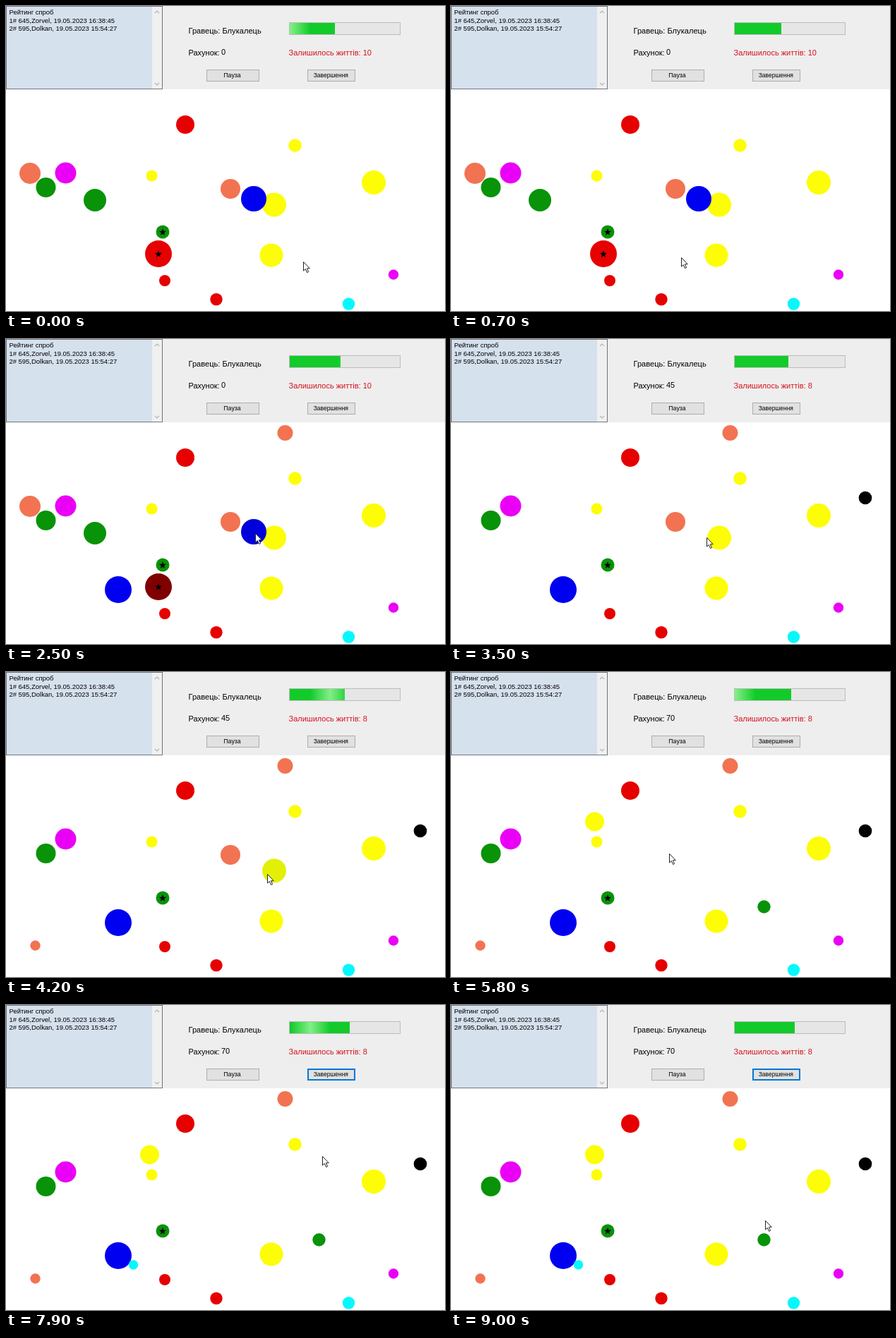
Animation, 622 px wide and 432 px high, one loop 9100 ms. Source, as an HTML page with a canvas:

```html
<!DOCTYPE html>
<html lang="uk">
<head>
<meta charset="utf-8">
<title>Кульки</title>
<style>
html, body { margin: 0; width: 100%; height: 100%; overflow: hidden; background: #fff; }
canvas { display: block; width: 622px; height: 432px; }
</style>
</head>
<body>
<canvas id="stage" width="622" height="432"></canvas>
<script>
const ctx = document.getElementById("stage").getContext("2d");
const LOOP = 9100, STEP = 100;
const FONT = '"Liberation Sans", Arial, sans-serif';

const CORAL = "#f27352", GREEN = "#089308", PINK = "#ea00f6", RED = "#e60000",
  YELLOW = "#fdfd05", BLUE = "#0000f0", CYAN = "#05f8fd", BLACK = "#000";

// x, y, radius, colour, options: from / to in ms, star, shades [time, colour]
const balls = [
  [34, 237, 15, CORAL, { to: 2700 }],
  [56.5, 257, 14, GREEN],
  [84.5, 236.5, 15, PINK],
  [126, 275, 16, GREEN, { to: 2900 }],
  [254, 168, 13, RED],
  [206.5, 240.5, 8, YELLOW],
  [409.5, 197.5, 9.3, YELLOW],
  [521, 250, 17, YELLOW],
  [318, 259, 14, CORAL, { to: 5200, shades: [[5000, "#dd6a4c"], [5100, "#b8563c"]] }],
  [380, 281.5, 17, YELLOW, { to: 4700, shades: [[4000, "#e2f008"], [4500, "#c4cc06"]] }],
  [351, 273, 18, BLUE, { to: 3000, shades: [[2400, "#0000da"], [2700, "#0000a8"]] }],
  [222, 320, 9.5, GREEN, { star: 1 }],
  [216, 351, 19, RED, { star: 1, to: 2800, shades: [[1300, "#d9606c"], [1700, "#b02c34"], [2000, "#800000"]] }],
  [376, 353, 16.5, YELLOW],
  [225, 389, 8, RED],
  [298, 415.5, 8.7, RED],
  [485.5, 422, 8.7, CYAN],
  [549, 380.5, 7.2, PINK],
  [159, 355, 19, BLUE, { from: 900 }],
  [395.5, 133, 11, CORAL, { from: 1800 }],
  [587, 225, 9.3, BLACK, { from: 2700 }],
  [41.5, 387.5, 7.2, CORAL, { from: 3600 }],
  [443.5, 332.5, 9.2, GREEN, { from: 4500 }],
  [203.5, 212, 13.5, YELLOW, { from: 5400 }],
  [180.5, 368, 6.7, CYAN, { from: 6300 }]
];

// time, x, y
const pointer = [
  [0, 421, 362], [200, 421, 362], [1200, 230, 349], [1900, 230, 349],
  [2400, 353, 275], [3100, 353, 275], [3900, 370, 286], [4600, 370, 286],
  [5000, 316, 260], [5300, 309, 257], [5900, 309, 257], [6700, 452, 94],
  [7300, 452, 94], [8400, 445, 305]
];
const barEnd = [
  [0, 466], [1500, 471], [2500, 474], [4200, 480], [4800, 480],
  [5200, 482], [5800, 482], [6800, 487]
];
const score = [[0, 0], [2800, 30], [3000, 45], [4700, 60], [5200, 70]];
const lives = [[0, 10], [2700, 9], [2900, 8]];

const smooth = k => k * k * (3 - 2 * k);

function held(keys, t, start) {
  return keys.reduce((v, [at, next]) => t >= at ? next : v, start);
}

function track(keys, t, i, ease = k => k) {
  const n = keys.findIndex(k => k[0] > t);
  if (n < 0) return keys[keys.length - 1][i];
  const a = keys[n - 1], b = keys[n];
  return a[i] + (b[i] - a[i]) * ease((t - a[0]) / (b[0] - a[0]));
}

function text(s, x, y, size, color = "#000", align = "left") {
  ctx.font = `${size}px ${FONT}`;
  ctx.textAlign = align;
  ctx.fillStyle = color;
  ctx.fillText(s, x, y);
}

function box(x, y, w, h, fill, line, weight = 1) {
  ctx.fillStyle = line;
  ctx.fillRect(x, y, w, h);
  ctx.fillStyle = fill;
  ctx.fillRect(x + weight, y + weight, w - 2 * weight, h - 2 * weight);
}

function polygon(points) {
  ctx.beginPath();
  points.forEach(([x, y]) => ctx.lineTo(x, y));
  ctx.closePath();
}

function chevron(x, y, dir) {
  ctx.beginPath();
  ctx.moveTo(x - 3, y + 1.5 * dir);
  ctx.lineTo(x, y - 1.5 * dir);
  ctx.lineTo(x + 3, y + 1.5 * dir);
  ctx.strokeStyle = "#b4b4b4";
  ctx.lineWidth = 1.2;
  ctx.stroke();
}

function drawList() {
  box(0, 0, 222, 118, "#d6e1ee", "#70757c");
  ctx.fillStyle = "#f0f0f0";
  ctx.fillRect(207, 1, 14, 116);
  chevron(214, 8.5, 1);
  chevron(214, 110.5, -1);
  text("Рейтинг спроб", 4.5, 12, 9.45);
  text("1# 645,Zorvel, 19.05.2023 16:38:45", 4.5, 23.5, 9.45);
  text("2# 595,Dolkan, 19.05.2023 15:54:27", 4.5, 35, 9.45);
}

function drawBar(t) {
  box(401, 23, 158, 18, "#e6e6e6", "#bcbcbc");
  const w = Math.round(track(barEnd, t, 1)) - 402;
  ctx.fillStyle = "#12cb2a";
  ctx.fillRect(402, 24, w, 16);
  const period = 1933;
  const phase = (t + 200) % period - 200;
  const mid = 403 + phase * 0.168;
  const shine = ctx.createLinearGradient(mid - 28, 0, mid + 28, 0);
  shine.addColorStop(0, "rgba(150,245,150,0)");
  shine.addColorStop(0.5, "rgba(150,245,150,.85)");
  shine.addColorStop(1, "rgba(150,245,150,0)");
  ctx.fillStyle = shine;
  ctx.fillRect(402, 24, w, 16);
}

function drawButtons(t, x, y) {
  box(284, 90, 75, 17, "#e1e1e1", "#adadad");
  text("Пауза", 320.5, 101.3, 8.8, "#000", "center");
  const over = x >= 427 && x < 495 && y >= 90 && y < 107;
  const focus = t >= 7000;
  const down = focus && t < 7100;
  const fill = down ? "#cce4f7" : over ? "#e5f1fb" : "#e1e1e1";
  box(427, 90, 68, 17, fill, over || focus ? "#0078d7" : "#adadad", focus && !over ? 2 : 1);
  text("Завершення", 460.3, 101.3, 8.5, "#000", "center");
}

function drawStar(x, y) {
  polygon(Array.from({ length: 10 }, (_, i) => {
    const r = i % 2 ? 2.2 : 5.4, a = i * Math.PI / 5;
    return [x + r * Math.sin(a), y - r * Math.cos(a)];
  }));
  ctx.fillStyle = BLACK;
  ctx.fill();
}

function drawBall([x, y, r, color, { from = 0, to = LOOP, star, shades = [] } = {}], t) {
  if (t < from || t >= to) return;
  ctx.beginPath();
  ctx.arc(x, y, r, 0, Math.PI * 2);
  ctx.fillStyle = held(shades, t, color);
  ctx.fill();
  if (star) drawStar(x, y + 0.5);
}

function drawPointer(x, y) {
  ctx.save();
  ctx.translate(x, y);
  polygon([[0, 0], [0, 12.6], [2.8, 10], [5, 15], [7.1, 14.1], [4.9, 9.3], [8.7, 9.1]]);
  ctx.fillStyle = "#fff";
  ctx.fill();
  ctx.strokeStyle = "#222";
  ctx.lineWidth = 1;
  ctx.stroke();
  ctx.restore();
}

function draw(t) {
  const x = Math.round(track(pointer, t, 1, smooth)) + 0.5;
  const y = Math.round(track(pointer, t, 2, smooth)) + 0.5;
  ctx.fillStyle = "#fff";
  ctx.fillRect(0, 0, 622, 432);
  ctx.fillStyle = "#eee";
  ctx.fillRect(0, 0, 622, 118);
  drawList();
  text("Гравець: Блукалець", 258.5, 39, 11.1);
  text("Рахунок:", 258.5, 69.5, 11);
  text(held(score, t), 305, 69, 11);
  text("Залишилось життів: " + held(lives, t), 400.5, 69.5, 11, "#d8101c");
  drawBar(t);
  drawButtons(t, x, y);
  balls.forEach(b => drawBall(b, t));
  drawPointer(x, y);
}

const start = performance.now();
function tick() {
  const t = (performance.now() - start) % LOOP;
  draw(Math.floor(t / STEP) * STEP);
  requestAnimationFrame(tick);
}
tick();
</script>
</body>
</html>
```
